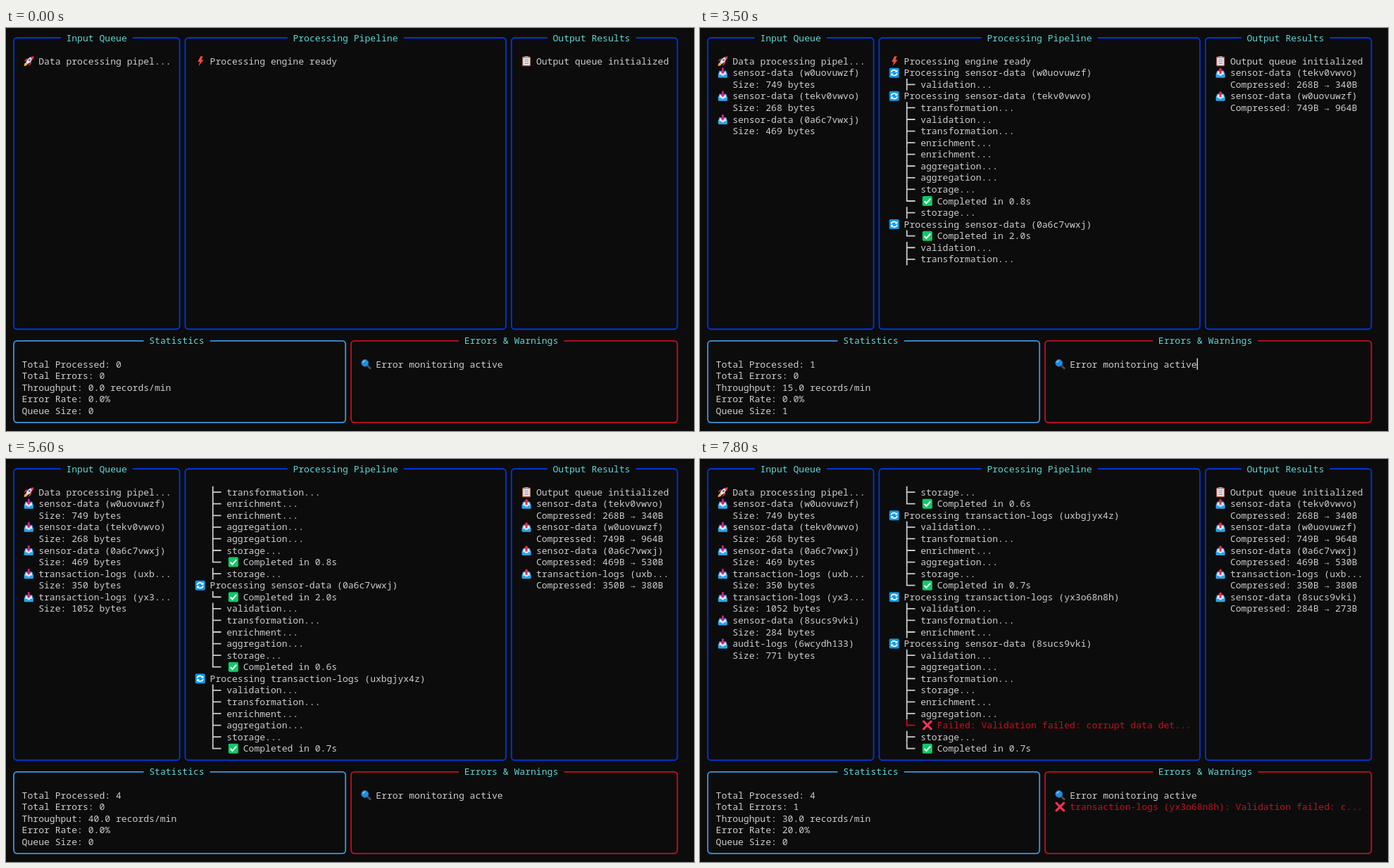
These frames come from a looping animation (977 by 573 pixels, 8 s). An HTML page:

```html
<!DOCTYPE html>
<html lang="en">
<head>
<meta charset="utf-8">
<title>Data pipeline dashboard</title>
<style>
html, body { margin: 0; width: 100%; height: 100%; overflow: hidden; background: #0c0c0c; }
svg { display: block; width: 977px; height: 573px; }
text { font: 500 13.088px "Noto Sans Mono", "DejaVu Sans Mono", monospace; white-space: pre; }
</style>
</head>
<body>
<svg id="stage" viewBox="0 0 977 573" xmlns="http://www.w3.org/2000/svg">
<defs>
  <g id="rocket">
    <path d="M-6.800 6.800Q-6.500 2.500-3.500 1.800L-1.500 4Q-2.500 6.500-6.800 6.800Z" fill="#fbb13c"/>
    <path d="M-2.500-1.800L-6.500 .8Q-5.500-3.500-1-3.800ZM2-2.500L3.800 1.200Q3.500 5.200-.8 6.500L1.500 2.500Z" fill="#e8343f"/>
    <path d="M-4 1.500Q-2-5 5-6.500Q5.500 0-1.500 4.200Z" fill="#e4dfec"/>
    <path d="M2.200-5.400Q4.500-6.700 7.200-6.800Q7-3.800 5.600-2Z" fill="#f0394a"/>
    <circle cx="1" cy="-1.600" r="1.500" fill="#3f7fb8"/>
  </g>
  <path id="bolt" d="M.5-7H4L1.800-2H4.800L-2.300 7L-.6 .8H-3.500Z" fill="#fa4b3c"/>
  <g id="board">
    <rect x="-6" y="-6.300" width="12" height="13.300" rx="1.200" fill="#b4694e"/>
    <path d="M-4.700-4.800H4.700V5.700H-4.700Z" fill="#f0edf4"/>
    <path d="M-2.800-7H2.800V-4H-2.800Z" fill="#a9a4b3"/>
    <path d="M-3-1.800H3M-3 .8H3M-3 3.400H3" stroke="#8d8998" stroke-width="1"/>
  </g>
  <g id="tray">
    <path d="M-4.800-3H4.800L6.600 2V5.500Q6.600 7 5 7H-5Q-6.600 7-6.600 5.500V2Z" fill="#2aa5e6"/>
    <path d="M-4-2H4L5 2.500H2.200L1.300 4H-1.300L-2.200 2.500H-5Z" fill="#dcecf8"/>
  </g>
  <g id="inbox"><use href="#tray"/><path d="M-1.400-7H1.400V-2.500H3.600L0 1.700L-3.600-2.500H-1.400Z" fill="#c8268f"/></g>
  <g id="outbox"><use href="#tray"/><path d="M-1.400 1.500H1.400V-3H3.600L0-7.200L-3.600-3H-1.400Z" fill="#e02c4c"/></g>
  <g id="cycle">
    <rect x="-7" y="-7" width="14" height="14" rx="1.800" fill="#0c99e8"/>
    <path d="M-4.200-.5Q-3.800-3.700 0-3.800Q2-3.800 3.200-2.200M4.200 .5Q3.800 3.700 0 3.800Q-2 3.800-3.200 2.200" fill="none" stroke="#fff" stroke-width="1.700"/>
    <path d="M4.700-4.600V-.7H.9ZM-4.700 4.600V.7H-.9Z" fill="#fff"/>
  </g>
  <g id="check">
    <rect x="-7" y="-7" width="14" height="14" rx="1.800" fill="#10c965"/>
    <path d="M-4.200 .3L-1.400 3.200L4.300-3.200" fill="none" stroke="#fff" stroke-width="2.100"/>
  </g>
  <path id="cross" d="M-5.300-5.300L5.300 5.300M5.300-5.300L-5.300 5.300" stroke="#f92f55" stroke-width="3.200" stroke-linecap="round"/>
  <g id="lens">
    <path d="M2 2L5.800 5.800" stroke="#4c4a58" stroke-width="3" stroke-linecap="round"/>
    <circle cx="-1.600" cy="-1.600" r="4.900" fill="#1c8fe0" stroke="#2f6f9f" stroke-width="1"/>
    <path d="M-4.500-2Q-4-4.500-1.500-4.700" fill="none" stroke="#8fd4f7" stroke-width="1.300"/>
  </g>
</defs>
<g id="frame"></g>
<g id="body"></g>
</svg>
<script>
const LOOP = 8000, ROWS = 23;
const INK = "#cccccc", RED = "#c50f1f", BLUE = "#0037da", SKY = "#3a96dd", CYAN = "#61d6d6";

// Terminal grid: column to left edge, row to vertical centre
const px = col => 22.8 + col * 7.853;
const py = row => 14 + row * 16.57;

const text = (col, row, str, fill = INK) =>
  `<text x="${px(col) - 0.2}" y="${py(row) + 4.6}" fill="${fill}">${str.replace(/&/g, "&amp;")}</text>`;
const icon = (name, col, row) =>
  `<use href="#${name}" x="${px(col) + 9.5}" y="${py(row)}"/>`;
const item = (name, col, row, str, fill) => icon(name, col, row) + text(col + 3, row, str, fill);

function panel(c0, c1, r0, r1, title, titleCol, color) {
  const x = px(c0 + 0.5), y = py(r0), gap = px(titleCol - 1);
  return `<rect x="${x}" y="${y}" width="${px(c1 + 0.5) - x}" height="${py(r1) - y}" rx="4.500" fill="none" stroke="${color}" stroke-width="1.800"/>` +
    `<rect x="${gap}" y="${y - 3}" width="${px(titleCol + title.length + 1) - gap}" height="6" fill="#0c0c0c"/>` +
    text(titleCol, r0, title, CYAN);
}

function branch(row, last, color) {
  const x = px(34.5), y = py(row), h = 16.57 / 2;
  return `<path d="M${x} ${y - h}V${last ? y : y + h + 0.2}M${x - 0.9} ${y}H${px(36)}" fill="none" stroke="${color}" stroke-width="1.800"/>`;
}

const inputs = [
  [400, "sensor-data (w0uovuwzf)", 749],
  [1600, "sensor-data (tekv0vwvo)", 268],
  [2900, "sensor-data (0a6c7vwxj)", 469],
  [4000, "transaction-logs (uxb...", 350],
  [5200, "transaction-logs (yx3...", 1052],
  [6500, "sensor-data (8sucs9vki)", 284],
  [7700, "audit-logs (6wcydh133)", 771]
];

const outputs = [
  [2700, "sensor-data (tekv0vwvo)", "268B → 340B"],
  [3300, "sensor-data (w0uovuwzf)", "749B → 964B"],
  [4000, "sensor-data (0a6c7vwxj)", "469B → 530B"],
  [5000, "transaction-logs (uxb...", "350B → 380B"],
  [7400, "sensor-data (8sucs9vki)", "284B → 273B"]
];

// First letter: P job, v/t/e/a/s stage, C done, F failed
const log = [
  [0, "R"],
  [700, "P sensor-data (w0uovuwzf)"], [1200, "v"],
  [1800, "P sensor-data (tekv0vwvo)"],
  [2000, "t"], [2100, "v"], [2100, "t"], [2200, "e"], [2200, "e"], [2300, "a"],
  [2500, "a"], [2500, "s"], [2700, "C 0.8s"], [2800, "s"],
  [3200, "P sensor-data (0a6c7vwxj)"], [3300, "C 2.0s"],
  [3400, "v"], [3500, "t"], [3600, "e"], [3800, "a"], [3900, "s"], [4000, "C 0.6s"],
  [4100, "P transaction-logs (uxbgjyx4z)"],
  [4200, "v"], [4400, "t"], [4500, "e"], [4700, "a"], [4800, "s"], [5000, "C 0.7s"],
  [5700, "P transaction-logs (yx3o68n8h)"], [5900, "v"], [6100, "t"], [6400, "e"],
  [6600, "P sensor-data (8sucs9vki)"],
  [6700, "v"], [6800, "a"], [6800, "t"], [6900, "s"], [7000, "e"], [7100, "a"],
  [7200, "F"], [7300, "s"], [7400, "C 0.7s"]
];

const stages = { v: "validation", t: "transformation", e: "enrichment", a: "aggregation", s: "storage" };

// Time, processed, errors, throughput, error rate, queue size
const stats = [
  [0, 0, 0, "0.0", "0.0", 0],
  [3300, 1, 0, "15.0", "0.0", 1],
  [5200, 4, 0, "40.0", "0.0", 0],
  [7200, 4, 1, "30.0", "20.0", 0]
];

const FAIL_AT = 7200;
const blinks = [[0, 100], [700, 800], [1700, 1800], [2100, 2200], [3800, 3900],
  [5000, 5200], [5300, 5700], [6000, 6100], [7800, 8000]];

function logLine([, entry], row) {
  const kind = entry[0], rest = entry.slice(2);
  if (kind === "R") return item("bolt", 31, row, "Processing engine ready");
  if (kind === "P") return item("cycle", 31, row, "Processing " + rest);
  if (kind === "C") return branch(row, true, INK) + item("check", 37, row, "Completed in " + rest);
  if (kind === "F") return branch(row, true, RED) +
    item("cross", 37, row, "Failed: Validation failed: corrupt data det...", RED);
  return branch(row, false, INK) + text(37, row, stages[kind] + "...");
}

function draw(t) {
  const past = list => list.filter(e => e[0] <= t);
  let out = item("rocket", 0, 2, "Data processing pipel...") +
    item("board", 90, 2, "Output queue initialized") +
    item("lens", 61, 28, "Error monitoring active");

  past(inputs).forEach(([, name, size], i) => {
    out += item("inbox", 0, 3 + 2 * i, name) + text(3, 4 + 2 * i, `Size: ${size} bytes`);
  });
  past(outputs).forEach(([, name, sizes], i) => {
    out += item("outbox", 90, 3 + 2 * i, name) + text(93, 4 + 2 * i, "Compressed: " + sizes);
  });
  past(log).slice(-ROWS).forEach((line, i) => { out += logLine(line, 2 + i); });

  const [, done, errors, rate, percent, queue] = past(stats).pop();
  [`Total Processed: ${done}`, `Total Errors: ${errors}`, `Throughput: ${rate} records/min`,
    `Error Rate: ${percent}%`, `Queue Size: ${queue}`
  ].forEach((line, i) => { out += text(0, 28 + i, line); });

  const failed = t >= FAIL_AT;
  if (failed) out += item("cross", 61, 29, "transaction-logs (yx3o68n8h): Validation failed: c...", RED);
  if (!blinks.some(([a, b]) => t >= a && t < b)) {
    const col = failed ? 117 : 87, row = failed ? 29 : 28;
    out += `<rect x="${px(col) - 0.4}" y="${py(row) - 8.5}" width="1.200" height="16.500" fill="#fff"/>`;
  }
  return out;
}

document.getElementById("frame").innerHTML =
  panel(-2, 28, 0, 25, "Input Queue", 8, BLUE) +
  panel(29, 87, 0, 25, "Processing Pipeline", 49, BLUE) +
  panel(88, 118, 0, 25, "Output Results", 96, BLUE) +
  panel(-2, 58, 26, 33, "Statistics", 23, SKY) +
  panel(59, 118, 26, 33, "Errors & Warnings", 80, RED);

const body = document.getElementById("body");
const start = performance.now();
let shown = -1;

function tick() {
  const step = Math.floor((performance.now() - start) % LOOP / 100);
  if (step !== shown) {
    shown = step;
    body.innerHTML = draw(step * 100);
  }
  requestAnimationFrame(tick);
}
tick();
</script>
</body>
</html>
```
